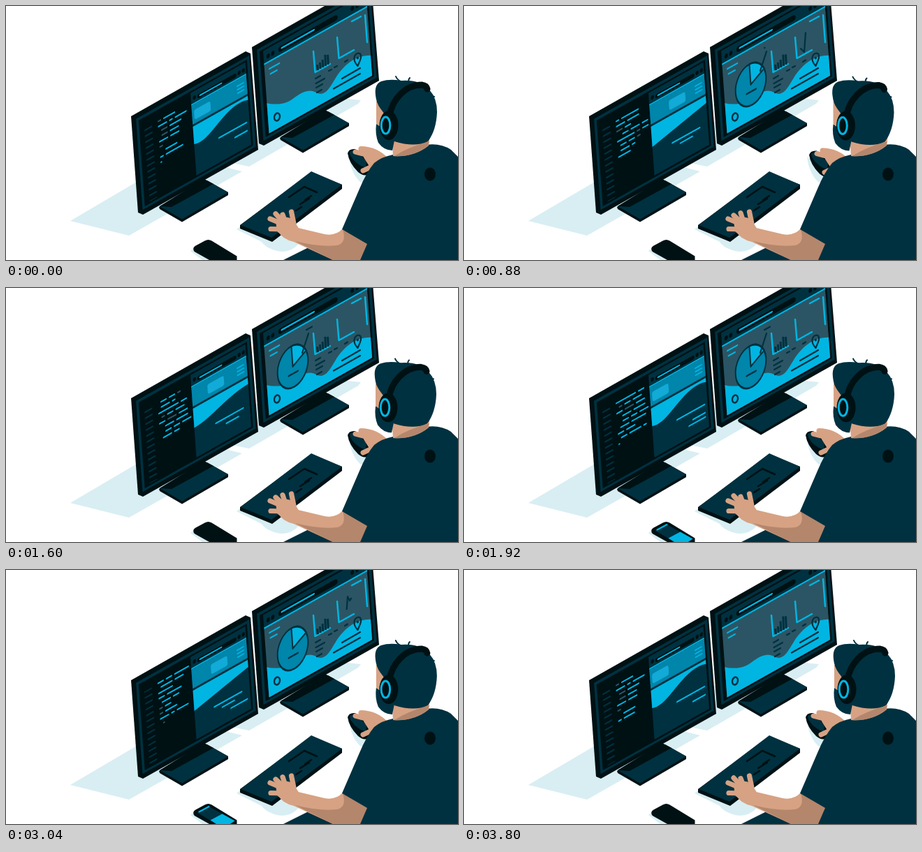
Recreate the animation shown at these times as an HTML page with a canvas. Size 647 by 364 pixels, loop 3840 ms.

```html
<!DOCTYPE html>
<html lang="en">
<head>
<meta charset="utf-8">
<title>Developer at work</title>
<style>
html, body { margin: 0; width: 100%; height: 100%; overflow: hidden; background: #fff; }
canvas { display: block; }
</style>
</head>
<body>
<canvas id="stage" width="647" height="364"></canvas>
<script>
const ctx = document.getElementById('stage').getContext('2d');
const LOOP = 3840;
const BLACK = '#001114', NAVY = '#003140', SLATE = '#2b5564', CYAN = '#00b5e2';
const TEAL = '#0085ab', CARD = '#12aad6', SHADE = '#d8eef3', SKIN = '#d6a283', DEEP = '#b4866c';

// One character is 4 units wide: c bright, s dim.
const CODE = ['s cccc', 'ccc c cccc', ' ss cccc', ' ss ccc', 'ccc ccc', 's', '  cccc', 'c cccccc',
  'ccc cccc', 'ss cc', '  cc ccc cc', 'cccccc s cc', ' cc cc s', ' ccc c', 'ccccccc cc', ' s cc ccc',
  'cc sss ccc', '  ccc cccc', '  cc cc ccc', ' ccc ccccc', 'cc ccc', ' cc cccc c', 'cc cc ccccc', ' cccc ccc',
  'ccccc', 'cc ccccc', ' ccc cc', 's cc'];

const clamp = x => Math.max(0, Math.min(1, x));
const smooth = x => { x = clamp(x); return x * x * (3 - 2 * x); };
const ramp = (t, a, b) => smooth((t - a) / (b - a));
const pulse = (t, a, b, c, d) => ramp(t, a, b) - ramp(t, c, d);
const mix = (a, b, k) => a + (b - a) * k;

function track(t, keys) {
  for (let i = 1; i < keys.length; i++) {
    const [t0, v0] = keys[i - 1], [t1, v1] = keys[i];
    if (t <= t1) return mix(v0, v1, clamp((t - t0) / (t1 - t0)));
  }
  return keys[keys.length - 1][1];
}

function fill(color, d) {
  ctx.fillStyle = color;
  ctx.fill(new Path2D(d));
}

function stroke(color, width, d) {
  ctx.strokeStyle = color;
  ctx.lineWidth = width;
  ctx.stroke(new Path2D(d));
}

function line(color, width, x1, y1, x2, y2) {
  stroke(color, width, `M${x1},${y1}L${x2},${y2}`);
}

function rect(color, x1, y1, x2, y2) {
  ctx.fillStyle = color;
  ctx.fillRect(x1, y1, x2 - x1, y2 - y1);
}

function ellipse(x, y, rx, ry, fillColor, lineColor, width, turn = 0) {
  ctx.beginPath();
  ctx.ellipse(x, y, rx, ry, turn, 0, 7);
  if (fillColor) { ctx.fillStyle = fillColor; ctx.fill(); }
  if (lineColor) { ctx.strokeStyle = lineColor; ctx.lineWidth = width; ctx.stroke(); }
}

function group(draw) {
  ctx.save();
  draw();
  ctx.restore();
}

// Monitors share a frame; u runs along the top edge and v down the side.
function monitor(x, y, drawScreen) {
  group(() => {
    ctx.translate(x, y);
    fill(BLACK, 'M40,130L41,133L73,151.5L139,113L139,109L109,92Z');
    fill(NAVY, 'M41,129L73,147.5L139,109L105,90Z');
    fill(BLACK, 'M41,129L58,130L118,97L104,90Z');
    fill(BLACK, 'M0,0L164,-93L171,-90L182,48L17,141L10,138Z');
    ctx.transform(1, -0.561, 0.0725, 1, 0, 0);
    rect(NAVY, 6.5, 7.5, 168.5, 138);
    rect(BLACK, 10, 11.5, 165, 134.5);
    ctx.beginPath();
    ctx.rect(12, 14, 150.5, 118);
    ctx.clip();
    drawScreen();
  });
}

function drawCode(t) {
  const pos = t / LOOP * CODE.length;
  const top = Math.floor(pos), part = pos - top;
  const shift = smooth(part / 0.4);
  group(() => {
    ctx.beginPath();
    ctx.rect(12, 26, 72, 109);
    ctx.clip();
    for (let i = 0; i < 14; i++) {
      const v = 30 + 8.5 * (i - shift);
      line(NAVY, 2.2, 18, v, 27, v);
    }
  });
  for (let i = 0; i <= 8; i++) {
    if (i === 0 && shift > 0.5) continue;
    const row = CODE[(top + i) % CODE.length];
    const v = 28 + 7.3 * (i - shift);
    const limit = i === 8 ? part * row.length : row.length;
    for (const run of row.matchAll(/c+|s+/g)) {
      const end = Math.min(run.index + run[0].length, limit);
      if (end <= run.index) continue;
      line(run[0][0] === 'c' ? CYAN : SLATE, 2.2,
        37 + run.index * 4, v, 36 + Math.max(end * 4, run.index * 4 + 1.2), v);
    }
  }
}

function drawSite(t) {
  const c = t % 1920;
  const card = pulse(c, 200, 480, 1500, 1850);
  const bend = pulse(c, 230, 520, 1450, 1850);
  const align = pulse(c, 430, 800, 1450, 1850);
  rect(NAVY, 84, 12, 165, 134);
  ellipse(89, 23, 2.3, 3, BLACK);
  ellipse(153, 23.5, 2.3, 3, BLACK);
  ellipse(159, 23.5, 2.3, 3, BLACK);
  line(BLACK, 6, 96, 24.3, 146, 24.3);
  line(CYAN, 2.2, 97, 24.3, 127.5, 24.3);
  rect(CYAN, 84, 30, 163, 32);
  rect(TEAL, 84, 32, 163, 59);
  ctx.fillStyle = CARD;
  ctx.beginPath();
  ctx.roundRect(mix(87, 111, card), 40, 23.5, 14, 3);
  ctx.fill();
  for (let i = 0; i < 3; i++) line(CYAN, 1.8, 149, 40.6 + i * 5, 158, 40.6 + i * 5);
  const bendTo = (a, b) => mix(a, b, bend);
  fill(CYAN, `M84,62H163V${bendTo(68, 72)}C${bendTo(130, 137)},${bendTo(55, 78)} ` +
    `${bendTo(107, 110)},${bendTo(98, 85)} 84,${bendTo(87, 91)}Z`);
  const text = (v, w, centred) => {
    const u = mix(158 - w, 131.5 - w / 2, centred);
    line(CYAN, 2.2, u, v, u + w, v);
  };
  text(mix(97.7, 101, align), 39, align);
  text(mix(109.5, 107.5, align), 17, align);
  const third = pulse(t, 1650, 1880, 3400, 3700);
  if (third > 0.02) text(115.5, 23 * third, 0);
}

function drawPie(t) {
  const size = pulse(t, 420, 760, 3080, 3500);
  if (size < 0.01) return;
  const callout = pulse(t, 680, 880, 2650, 2960);
  group(() => {
    ctx.translate(410.5, 112.5);
    ctx.transform(0.75, -0.421, 0.0725, 1, 0, 0);
    ctx.scale(size, size);
    ellipse(0, 0, 29, 29, TEAL, NAVY, 2.6);
    ctx.beginPath();
    ctx.moveTo(0, 0);
    ctx.arc(0, 0, 29, -1.57, -0.42);
    ctx.closePath();
    ctx.fillStyle = CYAN;
    ctx.fill();
    ctx.stroke();
    line(NAVY, 2.4, -9, 10, 9, 10);
  });
  if (callout > 0.01) line(NAVY, 2.2, 424, 93, mix(424, 433, callout), mix(93, 65, callout));
  const label = pulse(t, 840, 1100, 2550, 2750);
  if (label > 0.01) line(NAVY, 2.2, 430, 60, 430 + 8 * label, 60 - 4.5 * label);
}

function drawTrend(c) {
  const head = track(c, [[380, 0], [480, 13], [880, 43], [1120, 54], [1280, 59.5]]);
  const tail = track(c, [[480, 0], [880, 8], [1120, 25], [1280, 40], [1500, 59.5]]);
  if (head - tail < 0.3) return;
  group(() => {
    ctx.setLineDash([head - tail, 100]);
    ctx.lineDashOffset = -tail;
    stroke(NAVY, 2.2, 'M480,69L482,61L487,66L489,38L492,44L497,36');
  });
}

function drawBars(c) {
  [8, 9, 11, 16, 14].forEach((h, i) => {
    const x = 446.5 + i * 3.7, base = 92 - i * 2.05;
    const grow = pulse(c, 200 + i * 30, 440 + i * 20, 500 + i * 60, 900);
    const end = pulse(c, 1600, 1880, 1880, 1920) * (i > 1 ? 0.7 : 0);
    const height = h + (i > 2 ? 11 : -2) * grow + 5 * end;
    ctx.lineCap = 'butt';
    line(NAVY, 2.9, x, base, x - 0.8, base - height);
    ctx.lineCap = 'round';
  });
}

function drawDashboard(t) {
  const c = t % 1920;
  rect(NAVY, 15, 12, 165, 33);
  rect(SLATE, 15, 33, 163, 133);
  ellipse(21.5, 24.5, 2.5, 3.3, BLACK);
  ellipse(28, 24.5, 2.5, 3.3, BLACK);
  ellipse(142, 24, 2.5, 3.3, BLACK);
  ellipse(149, 24, 2.5, 3.3, BLACK);
  line(BLACK, 8, 40, 24.5, 117, 24.5);
  line(CYAN, 2.5, 41, 24, 87, 24);
  rect(CYAN, 15, 32, 163, 34.2);
  line(CYAN, 2.3, 22, 43.3, 36, 43.3);
  line(CYAN, 2.3, 23, 51, 32, 51);
  ctx.beginPath();
  ctx.rect(15, 33, 148, 100);
  ctx.clip();
  ctx.setTransform(1, 0, 0, 1, 0, 0);
  fill(CYAN, 'M365,137C388,144 402,140 412,132C426,121 436,119 444,124C457,131 464,116 472,103C484,84 503,66 533,72V210H365Z');
  stroke(CYAN, 2.5, 'M440,65L442.5,95L464,83M474,45L476.5,75L498,63M514,13L517,52M495,22L508,15');
  stroke(NAVY, 2.2, 'M443,104L450,100M443.5,111L456,104M444,117L453,112M445,124L452,120' +
    'M462,93L466,91M470,88L474,86M485,80L489,77.5M481,104L507,89M469,118.5L507,97');
  drawBars(c);
  drawTrend(c);
  drawPie(t);
  ellipse(388, 159, 3.9, 5.6, null, NAVY, 2.4, 0.25);
  stroke(NAVY, 2.2, 'M503.5,86C499,81 497.5,76 499,72C501,67 507,66 508,71C509,76 505,81 503.5,86Z');
  ellipse(503.4, 74.5, 1.5, 2.1, NAVY);
}

function drawPhone(t) {
  fill(SHADE, 'M264,351L275,342L297,364H281Z');
  group(() => {
    ctx.translate(0.5, -1.5);
    fill(BLACK, 'M268,348Q268,347 271,345L284,338Q289,335 294,338L330,360V368H295L270,354Q267,352 268,348Z');
    if (t < 1750 || t > 3500) return;
    fill(NAVY, 'M273,349L289,340L327,361L318,367H303Z');
    const rise = pulse(t, 1750, 1900, 3380, 3500);
    line(CYAN, 2, 276, 348, mix(276, 290, rise), mix(348, 340.5, rise));
    ctx.globalAlpha = rise;
    fill(CYAN, 'M292,360L309,351L327,361L318,367H303Z');
  });
}

function drawKeyboard() {
  fill(SHADE, 'M330,320L345,309L385,325L420,340Q405,357 384,350Q370,345 366,338Z');
  fill(BLACK, 'M335,314L437,238L481,256V262L381,338L335,319Z');
  fill(NAVY, 'M336,314L437,237L481,256L380,332Z');
  stroke(BLACK, 2.6, 'M405,274L427,259L445,267M428,278L437,272M421,284L434,276M415,293L423,288');
}

function drawMouseHand(t) {
  const move = pulse(t, 480, 760, 950, 1250);
  fill(SHADE, 'M491,216L518,237L525,250L508,253Q494,241 491,216Z');
  group(() => {
    ctx.translate(5 * move, 2.5 * move);
    fill(BLACK, 'M489,211Q491,204 500,205L520,221L520,240Q514,246 504,238Q491,225 489,211Z');
    fill(NAVY, 'M492,210Q494,206 501,208L516,222L515,231Q509,231 501,224Q493,217 492,210Z');
    stroke(SKIN, 7, 'M523,215L500,209M529,212L508,204.5M526,229L511,236');
    fill(SKIN, 'M508,201Q531,201 548,219L534,236L520,241L519,228L512,217Z');
  });
}

function drawTorso() {
  fill(NAVY, 'M397,364L435,345L470,327L520,338V364Z');
  fill(SKIN, 'M414,317L456,327Q472,330 482,319L518,339L508,364H468L412,338Q395,334 390,323Z');
  fill(DEEP, 'M414,337Q450,346 474,343Q488,340 482,320L519,339L508,364H468Z');
  fill(NAVY, 'M481,320L506,262Q516,238 527,225Q538,216 554,213Q582,215 601,199Q622,196 637,206L647,216V364H507L517,341Z');
  ellipse(607, 241, 8, 9.5, BLACK);
}

function drawTypingHand(t) {
  const tap = phase => 2.5 * Math.max(0, Math.sin(t / LOOP * Math.PI * 32 + phase));
  const finger = (x, y, phase) => line(SKIN, 7.2, 402, 315, x, y - tap(phase));
  fill(SKIN, 'M386,308Q399,298 411,306L420,320L410,336Q396,331 388,323Z');
  line(SKIN, 7.2, 400, 320, 379, 319.5);
  finger(378, 305, 0);
  finger(386, 300, 2);
  finger(396, 299, 4);
  line(SKIN, 7.2, 412, 312, 408.5, 295);
}

function drawHead(t) {
  const turn = track(t, [[0, 0], [560, 0.7], [880, 1], [1280, 0.7], [2400, 0.6], [3040, 0.1], [3360, 0]]);
  fill(SKIN, 'M552,188L607,184L605,200Q584,217 554,215Z');
  fill(DEEP, 'M556,215Q574,203 606,194L604,200Q583,217 556,215Z');
  group(() => {
    ctx.translate(-1.5 * turn, 0.5 * turn);
    fill(SKIN, 'M530,136L552,145L556,185L535,182L530,168Z');
    fill(NAVY, 'M530,169L537,174L545,188L557,188L553,207Q541,207 533,196Q528,184 530,169Z');
    fill(NAVY, 'M529,128Q527,112 537,108Q549,104 566,107Q592,105 606,120Q617,132 617,152Q616,178 604,194Q585,203 556,194L546,160Q541,154 536,147Q530,139 529,128Z');
    stroke(NAVY, 2, 'M558,101Q560,106 567,109M578,103Q575,106 577,111M606,132Q609,128 613,130');
    stroke(BLACK, 9, 'M549,158C552,135 571,113 595,113Q602,114 603,119');
    ellipse(548, 171, 13.5, 21, BLACK);
    ellipse(543.5, 171, 6.3, 12, BLACK, CYAN, 3);
  });
}

function draw(t) {
  ctx.setTransform(1, 0, 0, 1, 0, 0);
  ctx.lineCap = ctx.lineJoin = 'round';
  rect('#fff', 0, 0, 647, 364);
  fill(SHADE, 'M92,308L250,215L338,237L176,329Z');
  fill(SHADE, 'M270,225L420,126L508,135L504,140L348,230L328,226Z');
  monitor(352, 59, () => drawDashboard(t));
  monitor(179, 158, () => {
    drawCode(t);
    drawSite(t);
  });
  drawPhone(t);
  drawKeyboard();
  drawMouseHand(t);
  drawTorso();
  drawTypingHand(t);
  drawHead(t);
}

const start = performance.now();
function tick() {
  draw((performance.now() - start) % LOOP);
  requestAnimationFrame(tick);
}
tick();
</script>
</body>
</html>
```
